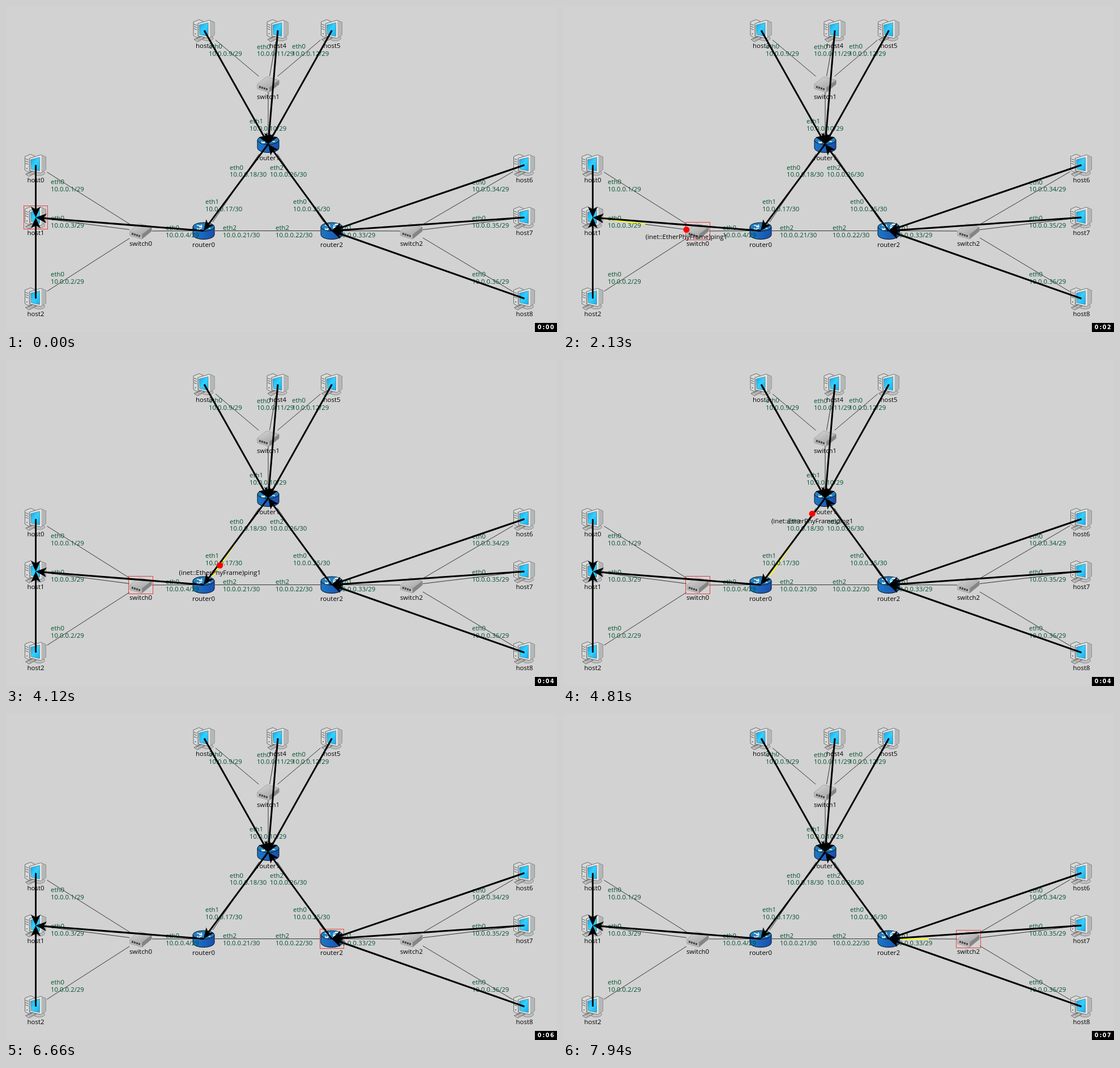
Animation of 973 by 575 pixels, one loop 8 s. Source, as an HTML page:

```html
<!DOCTYPE html>
<html lang="en">
<head>
<meta charset="utf-8">
<title>Network packet animation</title>
<style>
  html, body { margin: 0; width: 100%; height: 100%; overflow: hidden; background: #d2d2d2; }
  svg { display: block; width: 973px; height: 575px; }
  text { font: 11.4px "Open Sans", "Noto Sans", sans-serif; }
  .mid { text-anchor: middle; }
  .iface { fill: #00502f; }
  .link { stroke: #222; stroke-width: .9; }
  .clock { font: bold 9.6px "DejaVu Sans", sans-serif; fill: #fff; }
</style>
</head>
<body>
<svg viewBox="0 0 973 575">
  <defs>
    <linearGradient id="blue" x2="1">
      <stop offset="0" stop-color="#1a78c6"/><stop offset="1" stop-color="#1a4fae"/>
    </linearGradient>
    <linearGradient id="screen" x2="1" y2="1">
      <stop offset="0" stop-color="#0da4ea"/><stop offset=".5" stop-color="#35d0ff"/><stop offset="1" stop-color="#12aef0"/>
    </linearGradient>
    <linearGradient id="metal" x2="1" y2="1">
      <stop offset="0" stop-color="#d6d6d6"/><stop offset="1" stop-color="#a2a2a2"/>
    </linearGradient>
    <g id="host" stroke-linejoin="round">
      <path d="M-19-15L-9-19-2-16V9L-12 13-19 9Z" fill="#d9dbda" stroke="#5d605f" stroke-width=".9"/>
      <path d="M-12-12V12L-3 9V-15Z" fill="#a9acab"/>
      <path d="M-18-11l5 2m-5 2l5 2m-5 2l5 2" stroke="#555" fill="none"/>
      <circle cx="-15.5" cy="6" r="1" fill="#555"/>
      <ellipse cx="6" cy="14" rx="10" ry="4.5" fill="#bfc1c0" stroke="#777" stroke-width=".8"/>
      <path d="M-11-12L9-18 18-14V8L9 14-10 10Z" fill="#e6e8e7" stroke="#606362" stroke-width=".9"/>
      <path d="M10-17L18-13V8L10 13Z" fill="#b4b7b6"/>
      <path d="M-9-9.5L7-13.5V10.500L-8 7.500Z" fill="url(#screen)" stroke="#5b7480" stroke-width=".7"/>
      <path d="M-18 16L-5 10.500 1 13.500-12 20Z" fill="#cfd1d0" stroke="#555" stroke-width=".9"/>
      <path d="M-15 16l11-4.500m-8 6l11-4.500" stroke="#777" stroke-width=".9"/>
    </g>
    <g id="router">
      <path d="M-19-7V7A19 8 0 0 0 19 7V-7Z" fill="url(#blue)" stroke="#07101c"/>
      <ellipse cy="-7" rx="19" ry="7.500" fill="#217fbd" stroke="#07101c"/>
      <path id="arm" d="M-12-10l8 2m-4 1l5 0-1-4" fill="none" stroke="#e8f3fa" stroke-width="1.500"/>
      <use href="#arm" transform="rotate(180 0 -7)"/>
      <path d="M3-9l7-2.500m-4-.5h5v3M-3-5l-7 2.500m4 .5h-5v-3" fill="none" stroke="#e8f3fa" stroke-width="1.500"/>
    </g>
    <g id="switch" stroke-linejoin="round">
      <path d="M-19 0L-3-13 19-7V0L2 14-19 8Z" fill="#999" stroke="#777" stroke-width=".8"/>
      <path d="M-19 0L-3-13 19-7 2 6Z" fill="url(#metal)"/>
      <path d="M-19 0L2 6V14L-19 8Z" fill="#b9b9b9"/>
      <path d="M2 6L19-7V0L2 14Z" fill="#858585"/>
      <path d="M-16 4.500L0 9.500" stroke="#444" stroke-width="3.500" stroke-dasharray="3 1.200"/>
    </g>
  </defs>
  <g id="links"></g>
  <path id="busy" fill="none" stroke="#ff0" stroke-width="2"/>
  <g id="nodes"></g>
  <rect id="mark" fill="none" stroke="#ee3c3c"/>
  <g id="labels"></g>
  <g id="routes"></g>
  <g id="packet">
    <circle r="5.500" fill="#f00"/>
    <text class="mid" y="16.500">(inet::EtherPhyFrame)ping1</text>
  </g>
  <rect x="934" y="559" width="39" height="16"/>
  <text id="clock" class="clock" x="938.700 947.500 952.700 961" y="570">0:00</text>
</svg>
<script>
const $ = id => document.getElementById(id);

const nodes = {
  host0: [52.5, 280.5], host1: [52.5, 373], host2: [52.5, 516],
  host3: [350, 43], host4: [480, 43], host5: [575.5, 43],
  host6: [915.5, 280.5], host7: [915.5, 373], host8: [915.5, 516],
  switch0: [238, 397], switch1: [463, 138], switch2: [716, 397],
  router0: [349, 396.5], router1: [463, 243.5], router2: [575, 396.5]
};

// icon half size, label baseline offset, marker half size
const kinds = {
  host: { w: 20, h: 20, label: 30.5, mw: 21, mh: 20.5 },
  switch: { w: 20, h: 14, label: 26, mw: 21.5, mh: 15.5 },
  router: { w: 20, h: 15, label: 28, mw: 21, mh: 17 }
};
const kindOf = name => name.slice(0, -1);

// point where the straight line from a to b leaves a's icon
function edge(a, b) {
  const [x, y] = nodes[a], dx = nodes[b][0] - x, dy = nodes[b][1] - y;
  const { w, h } = kinds[kindOf(a)];
  const k = Math.min(w / Math.abs(dx), h / Math.abs(dy));
  return [x + dx * k, y + dy * k];
}
const span = (a, b) => [...edge(a, b), ...edge(b, a)];

const upLink = [365, 381, 447, 261], downLink = [479, 261, 561, 381];
const pairs = [
  ["host0", "switch0"], ["host1", "switch0"], ["host2", "switch0"],
  ["host3", "switch1"], ["host4", "switch1"], ["host5", "switch1"],
  ["host6", "switch2"], ["host7", "switch2"], ["host8", "switch2"],
  ["switch0", "router0"], ["switch1", "router1"], ["switch2", "router2"],
  ["router0", "router2"]
];
$("links").innerHTML = [...pairs.map(p => span(...p)), upLink, downLink]
  .map(([a, b, c, d]) => `<line class="link" x1="${a}" y1="${b}" x2="${c}" y2="${d}"/>`).join("");

$("nodes").innerHTML = Object.entries(nodes).map(([name, [x, y]]) => {
  const kind = kindOf(name);
  return `<use href="#${kind}" x="${x}" y="${y}"/>
    <text class="mid" x="${x}" y="${y + kinds[kind].label}">${name}</text>`;
}).join("");

// x, first baseline, interface, address tail
const ifaces = [
  [79, 314, 0, "1/29"], [79, 378, 0, "3/29"], [79, 477, 0, "2/29"],
  [282, 395, 0, "4/29"], [352, 349, 1, "17/30"], [383, 395, 2, "21/30"],
  [395, 288.5, 0, "18/30"], [430, 207, 1, "10/29"], [466, 288.5, 2, "26/30"],
  [358, 75, 0, "9/29"], [443, 75.5, 0, "11/29"], [505, 75, 0, "12/29"],
  [507, 349, 0, "25/30"], [476, 395, 2, "22/30"], [587, 395, 1, "33/29"],
  [823, 314.5, 0, "34/29"], [823, 378, 0, "35/29"], [823, 477, 0, "36/29"]
];
$("labels").innerHTML = ifaces.map(([x, y, n, tail]) =>
  `<text class="iface" x="${x}" y="${y}">eth${n}</text>
   <text class="iface" x="${x}" y="${y + 12.5}">10.0.0.${tail}</text>`).join("");

const routes = [
  ["host3", "router1"], ["host4", "router1"], ["host5", "router1"],
  ["router1", "router0"], ["router2", "router1"],
  ["host6", "router2"], ["host7", "router2"], ["host8", "router2"],
  ["router0", "host1"], ["host0", "host1"], ["host2", "host1"]
];
$("routes").innerHTML = routes.map(([a, b]) => {
  const [x, y] = nodes[b], dx = x - nodes[a][0], dy = y - nodes[a][1];
  const turn = Math.atan2(dy, dx) * 180 / Math.PI;
  return `<g transform="translate(${x} ${y}) rotate(${turn})">
    <path d="M${-Math.hypot(dx, dy)} 0H-12" stroke="#000" stroke-width="3"/>
    <path d="M0 0L-19-8.5-14 0-19 8.5Z"/></g>`;
}).join("");

const LOOP = 8000;

// redraw times: first, last, count
const bursts = [
  [0, 0, 1], [960, 960, 1], [1200, 1920, 7], [2020, 2720, 7], [2840, 3170, 4],
  [3290, 3530, 3], [3650, 3650, 1], [4000, 4690, 7], [4810, 5260, 5],
  [5500, 6210, 7], [6330, 6660, 4], [6900, 7600, 7], [7710, 7940, 3]
];
const ticks = bursts.flatMap(([a, b, n]) =>
  Array.from({ length: n }, (_, i) => Math.floor((a + (b - a) * i / Math.max(1, n - 1)) / 10) * 10));

// each hop: link, first shown, packet gone, link idle, [time, progress] keys
const hops = [
  { line: span("host1", "switch0"), on: 1200, gone: 2240, idle: 2350, keys: [[1080, 0], [2080, 1]] },
  { line: [258, 397, 330, 397], on: 2350, gone: 3520, idle: 3640, keys: [[2366, 0], [3524, 1]] },
  { line: upLink, on: 4000, gone: 5020, idle: 5250, keys: [[3950, 0], [4690, .72], [4810, .915], [4880, 1]] },
  { line: downLink, on: 5500, gone: 6500, idle: 6650, keys: [[5470, 0], [5970, .561], [6210, .829], [6360, 1]] },
  { line: [595, 397, 697, 397], on: 6900, gone: 7940, idle: LOOP, keys: [[6840, 0], [6900, .06], [7600, .657], [7830, .94]] }
];

const marks = [
  [0, "host1"], [1200, "switch0"], [2350, "host1"], [3640, "router0"], [4000, "switch0"],
  [5250, "router1"], [5500, "router0"], [6650, "router2"], [6900, "switch2"]
];
const seconds = [960, 2000, 2900, 4000, 5000, 6330, 7000];

function progress(keys, t) {
  if (t <= keys[0][0]) return keys[0][1];
  for (let i = 1; i < keys.length; i++) {
    const [t0, p0] = keys[i - 1], [t1, p1] = keys[i];
    if (t < t1) return p0 + (p1 - p0) * (t - t0) / (t1 - t0);
  }
  return keys[keys.length - 1][1];
}

const show = (el, on) => el.setAttribute("visibility", on ? "visible" : "hidden");

function draw(t) {
  const hop = hops.find(h => t >= h.on && t < h.idle);
  show($("busy"), hop);
  show($("packet"), hop && t < hop.gone);
  if (hop) {
    const [x0, y0, x1, y1] = hop.line, p = progress(hop.keys, t);
    $("busy").setAttribute("d", `M${x0} ${y0}L${(x0 + x1) / 2} ${(y0 + y1) / 2}`);
    $("packet").setAttribute("transform", `translate(${x0 + (x1 - x0) * p} ${y0 + (y1 - y0) * p})`);
  }

  const name = marks.filter(m => m[0] <= t).pop()[1];
  const [x, y] = nodes[name], { mw, mh } = kinds[kindOf(name)];
  const box = { x: Math.floor(x - mw) + .5, y: Math.floor(y - mh) + .5, width: mw * 2, height: mh * 2 };
  for (const key in box) $("mark").setAttribute(key, box[key]);

  $("clock").textContent = "0:0" + seconds.filter(s => s <= t).length;
}

let start, last = -1;
function loop(now) {
  start ??= now;
  const t = (now - start) % LOOP;
  const tick = ticks.filter(s => s <= t).pop();
  if (tick !== last) draw(last = tick);
  requestAnimationFrame(loop);
}
draw(0);
requestAnimationFrame(loop);
</script>
</body>
</html>
```
